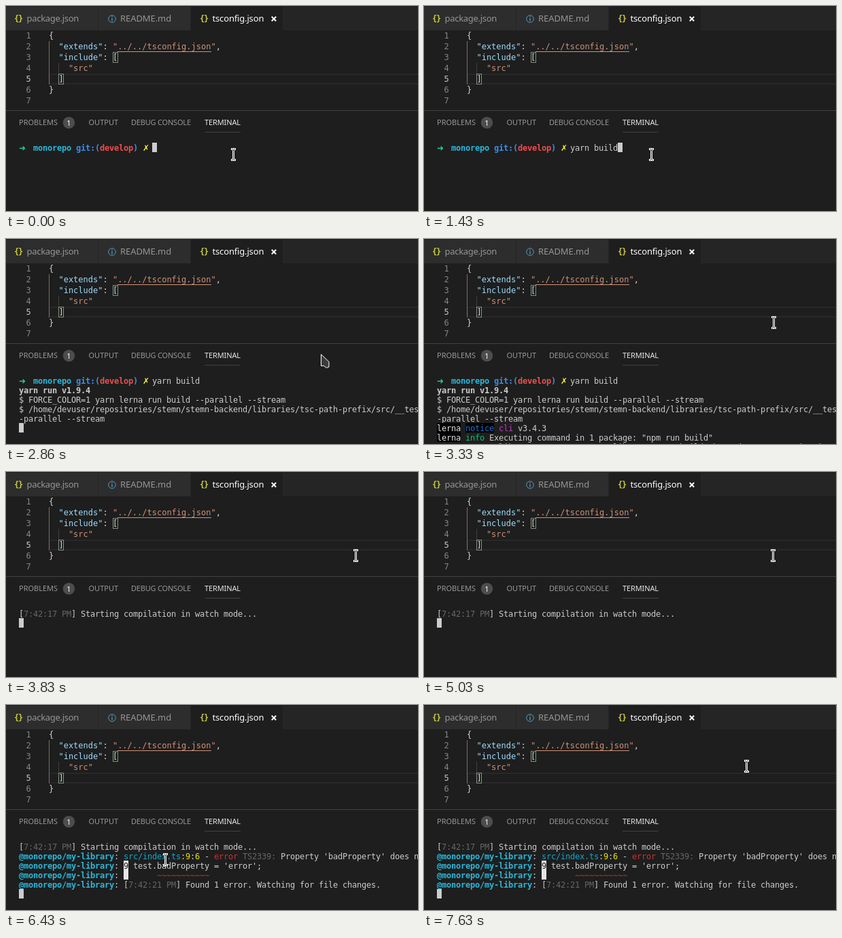
An HTML page that plays this animation: 606 by 303 pixels, repeating every 8000 ms.

```html
<!DOCTYPE html>
<html lang="en">
<head>
<meta charset="utf-8">
<title>Editor terminal</title>
<style>
  html, body { margin: 0; width: 100%; height: 100%; overflow: hidden; background: #1e1e1e; }
  svg { display: block; width: 606px; height: 303px; }
  text { white-space: pre; }
  .mono { font: 12px "DejaVu Sans Mono", "DejaVu Sans", monospace; }
  .symbol { font: 12px "DejaVu Sans", sans-serif; }
  .bold { font-weight: bold; }
  .tab { font: 13px "Noto Sans", "Open Sans", sans-serif; }
  .title { font: 11px "Noto Sans", "Open Sans", sans-serif; }
</style>
</head>
<body>
<svg id="stage" viewBox="0 0 606 303" xml:space="preserve"></svg>
<script>
const LOOP = 8000, FRAME = 100 / 3;
const EDIT_W = 7.2246, CELL_W = 7, CELL_H = 14, TERM_X = 19, TERM_Y = 202;

const C = {
  fg: '#cccccc', white: '#e5e5e5', gray: '#666666', cyan: '#11a8cd', brightCyan: '#29b8db',
  green: '#0dbc79', brightGreen: '#23d18b', blue: '#2472c8', brightBlue: '#3b8eea',
  red: '#cd3131', brightRed: '#f14c4c', yellow: '#e5e510', brightYellow: '#f5f543',
  magenta: '#bc3fbc', key: '#9cdcfe', str: '#ce9178', punct: '#d4d4d4'
};

const rect = (x, y, w, h, fill, more = '') =>
  `<rect x="${x}" y="${y}" width="${w}" height="${h}" fill="${fill}" ${more}/>`;

// Monospace text, one character per column; the wide dingbats use the proportional face
const grid = (str, x, y, w, fill, bold) => {
  const xs = [...str].map((_, i) => +(x + i * w).toFixed(2)).join(' ');
  const face = /[➜✗]/.test(str) ? 'symbol' : 'mono';
  return `<text class="${face}${bold ? ' bold' : ''}" x="${xs}" y="${y}" fill="${fill}">${str}</text>`;
};

const label = (cls, str, x, y, fill, gap = 0) =>
  `<text class="${cls}" x="${x}" y="${y}" fill="${fill}" letter-spacing="${gap}">${str}</text>`;

/* ---------- editor and panel frame ---------- */

const braces = x =>
  `<text class="mono bold" x="${x} ${x + 6}" y="23" fill="#cbcb41">{}</text>`;

function tabs() {
  return rect(0, 1, 606, 35, '#252526') +
    rect(0, 1, 135, 35, '#2d2d2d') + rect(136, 1, 135, 35, '#2d2d2d') + rect(272, 1, 135, 35, '#1e1e1e') +
    braces(12) + label('tab', 'package.json', 30.5, 23, '#969696', -.29) +
    '<g stroke="#519aba" fill="none"><circle cx="156" cy="19" r="5.3"/>' +
    '<path d="M156 18V22.2M156 15.3V16.8" stroke-width="1.4"/></g>' +
    label('tab', 'README.md', 168, 23, '#969696', -.08) +
    braces(285) + label('tab', 'tsconfig.json', 303.5, 23, '#ffffff', -.16) +
    '<path d="M390.8 15.8L397.2 22.2M397.2 15.8L390.8 22.2" stroke="#fff" stroke-width="2"/>';
}

const code = [
  [['{', C.punct]],
  [['  "extends"', C.key], [': ', C.punct], ['"../../tsconfig.json"', C.str], [',', C.punct]],
  [['  "include"', C.key], [': [', C.punct]],
  [['    "src"', C.str]],
  [['  ]', C.punct]],
  [['}', C.punct]],
  []
];

function editor() {
  let out = rect(64, 101, 560, 14, 'none', 'stroke="#282828" stroke-width="2"') +
    rect(63, 52, 1, 64, '#707070') + rect(77, 84, 1, 16, '#404040');
  for (const [x, y] of [[157.5, 68.5], [77.5, 100.5]])
    out += rect(x, y, 7, 15, 'rgba(0,100,0,.1)', 'stroke="#888888"');
  code.forEach((parts, i) => {
    const y = 48 + i * 16;
    out += grid(String(i + 1), 29.5, y, EDIT_W, i === 4 ? '#c6c6c6' : '#858585');
    let col = 0;
    for (const [str, fill] of parts) {
      out += grid(str, 63 + col * EDIT_W, y, EDIT_W, fill);
      col += str.length;
    }
  });
  return out + rect(164, 67, 138, 1, C.str);
}

function panel() {
  const dim = '#979797';
  return rect(0, 154, 606, 1, '#414141') +
    label('title', 'PROBLEMS', 19, 176, dim) +
    '<circle cx="92.5" cy="172.5" r="8.7" fill="#4d4d4d"/>' +
    label('title', '1', 89.3, 176.5, '#ffffff') +
    label('title', 'OUTPUT', 121.5, 176, dim) +
    label('title', 'DEBUG CONSOLE', 184, 176, dim, -.2) +
    label('title', 'TERMINAL', 292, 176, '#e7e7e7', -.12) +
    rect(292, 186, 53, 1, '#414141');
}

/* ---------- terminal: rows of [text, colour, bold, background] ---------- */

const prompt = [
  ['➜', C.brightGreen, 1], ['  '], ['monorepo', C.brightCyan, 1], [' '],
  ['git:(', C.brightBlue, 1], ['develop', C.brightRed, 1], [')', C.brightBlue, 1],
  [' '], ['✗', C.brightYellow, 1], [' ']
];
const lib = [['@monorepo/my-library', C.brightCyan, 1], [': ']];
const lerna = ['lerna', C.white, 0, '#000000'];
const stamp = s => [['['], [`7:42:${s} PM`, C.gray], ['] ']];
const home = '/home/devuser/repositories/stemn/stemn-backend/libraries/tsc-path-prefix/src/__tests__';

const buildLog = [
  [2230, [['yarn run v1.9.4', C.fg, 1]]],
  [2260, [['$ FORCE_COLOR=1 yarn lerna run build --parallel --stream']]],
  [2600, [['$ ' + home]]],
  [2600, [['-parallel --stream']]],
  [3000, [lerna, [' '], ['notice', C.blue, 0, '#000000'], [' '], ['cli', C.magenta], [' v3.4.3']]],
  [3000, [lerna, [' '], ['info', C.green], [' Executing command in 1 package: "npm run build"']]],
  [3330, [...lib, ['> @monorepo/my-library@1.0.0 build ' + home]]]
];

const watchLog = [
  [3830, [...stamp(17), ['Starting compilation in watch mode...']]],
  [5130, [...lib, ['src/index.ts', C.cyan], [':'], ['9', C.yellow], [':'], ['6', C.yellow], [' - '],
    ['error', C.red], [' '], ['TS2339: ', C.gray], ["Property 'badProperty' does not exist"]]],
  [5130, [...lib, ['9', '#1e1e1e', 0, C.white], [" test.badProperty = 'error';"]]],
  [5130, [...lib, [' ', C.fg, 0, C.white], ['      '], ['~'.repeat(11), C.red]]],
  [5130, [...lib, ...stamp(21), ['Found 1 error. Watching for file changes.']]]
];

// [time, letters typed]
const typing = [[560, 1], [730, 2], [800, 4], [860, 5], [1160, 6], [1260, 7], [1330, 9], [1430, 10]];
const ENTER = 1860;

function screen(t) {
  const shown = log => log.filter(e => t >= e[0]).map(e => e[1]);
  if (t >= watchLog[0][0]) return { rows: shown(watchLog), open: false };
  const typed = typing.reduce((n, [at, count]) => t >= at ? count : n, 0);
  const line = [...prompt, ['yarn build'.slice(0, typed)]];
  return { rows: [line, ...shown(buildLog)], open: t < ENTER };
}

function terminal(t) {
  const { rows, open } = screen(t);
  let out = '', col = 0;
  rows.forEach((parts, r) => {
    const top = TERM_Y + r * CELL_H;
    col = 0;
    for (const [str, fill = C.fg, bold, bg] of parts) {
      const x = TERM_X + col * CELL_W;
      if (bg) out += rect(x, top, str.length * CELL_W, CELL_H, bg);
      if (str.trim()) out += grid(str, x, top + 12, CELL_W, fill, bold);
      col += str.length;
    }
  });
  const r = open ? 0 : rows.length;
  return out + rect(TERM_X + (open ? col : 0) * CELL_W, TERM_Y + r * CELL_H, CELL_W, CELL_H, C.fg);
}

/* ---------- mouse ---------- */

const smooth = u => u * u * (3 - 2 * u);
const linear = u => u;
const slow = u => 1 - (1 - u) ** 2;

// [time, x, y, easing on the way here]
const path = [
  [0, 334.5, 219.5], [2733, 334.5, 219.5], [2867, 463, 170, linear], [2902, 463, 170],
  [3067, 514.5, 123.5, slow], [5030, 514.5, 123.5], [5033, 513.5, 123.5], [5567, 513.5, 123.5],
  [5867, 317.5, 213.5, smooth], [6067, 317.5, 213.5], [6133, 323.5, 210.5, linear],
  [6433, 234.5, 228.5, smooth], [6502, 234.5, 228.5], [6667, 230.5, 234.5, slow],
  [6867, 230.5, 234.5], [6933, 230.5, 228.5, linear], [7333, 230.5, 228.5],
  [7633, 474.5, 90.5, smooth], [LOOP, 474.5, 90.5]
];

function mouseAt(t) {
  const i = Math.max(1, path.findIndex(p => p[0] >= t));
  const [t0, x0, y0] = path[i - 1], [t1, x1, y1, ease = linear] = path[i];
  const u = ease((t - t0) / (t1 - t0));
  return [x0 + (x1 - x0) * u, y0 + (y1 - y0) * u];
}

const INK = '#3c3c3c';
const beamPath = 'M-2-8H-1L0-7L1-8H2M0-7V7M-2 8H-1L0 7L1 8H2';
const beam = (color, w) =>
  `<path d="${beamPath}" fill="none" stroke="${color}" stroke-width="${w}" stroke-linecap="square"/>`;

const stage = document.getElementById('stage');
stage.innerHTML = rect(0, 0, 606, 303, '#1e1e1e') + tabs() + editor() + panel() +
  '<g id="term"></g><g id="mouse">' +
  `<g id="beam">${beam('#ffffff', 3)}${beam(INK, 1)}</g>` +
  `<path id="arrow" d="M.5.5V17.5H4.5L8.5 20.5L12 19V11.5Z" fill="${INK}" stroke="#fff"/></g>`;

const [term, mouse, beamEl, arrow] =
  ['term', 'mouse', 'beam', 'arrow'].map(id => document.getElementById(id));
let last = '';

function draw(t) {
  const html = terminal(t);
  if (html !== last) term.innerHTML = last = html;

  // The pointer moves on a 30 fps grid
  const [x, y] = mouseAt(Math.floor((t + 7) / FRAME) * FRAME);
  const overTitles = y > 155 && y < 196;
  const snap = v => overTitles ? Math.round(v) : Math.floor(v) + .5;
  mouse.setAttribute('transform', `translate(${snap(x)} ${snap(y)})`);
  beamEl.style.display = overTitles ? 'none' : '';
  arrow.style.display = overTitles ? '' : 'none';
}

const start = performance.now();
function tick() {
  draw((performance.now() - start) % LOOP);
  requestAnimationFrame(tick);
}
draw(0);
requestAnimationFrame(tick);
</script>
</body>
</html>
```
